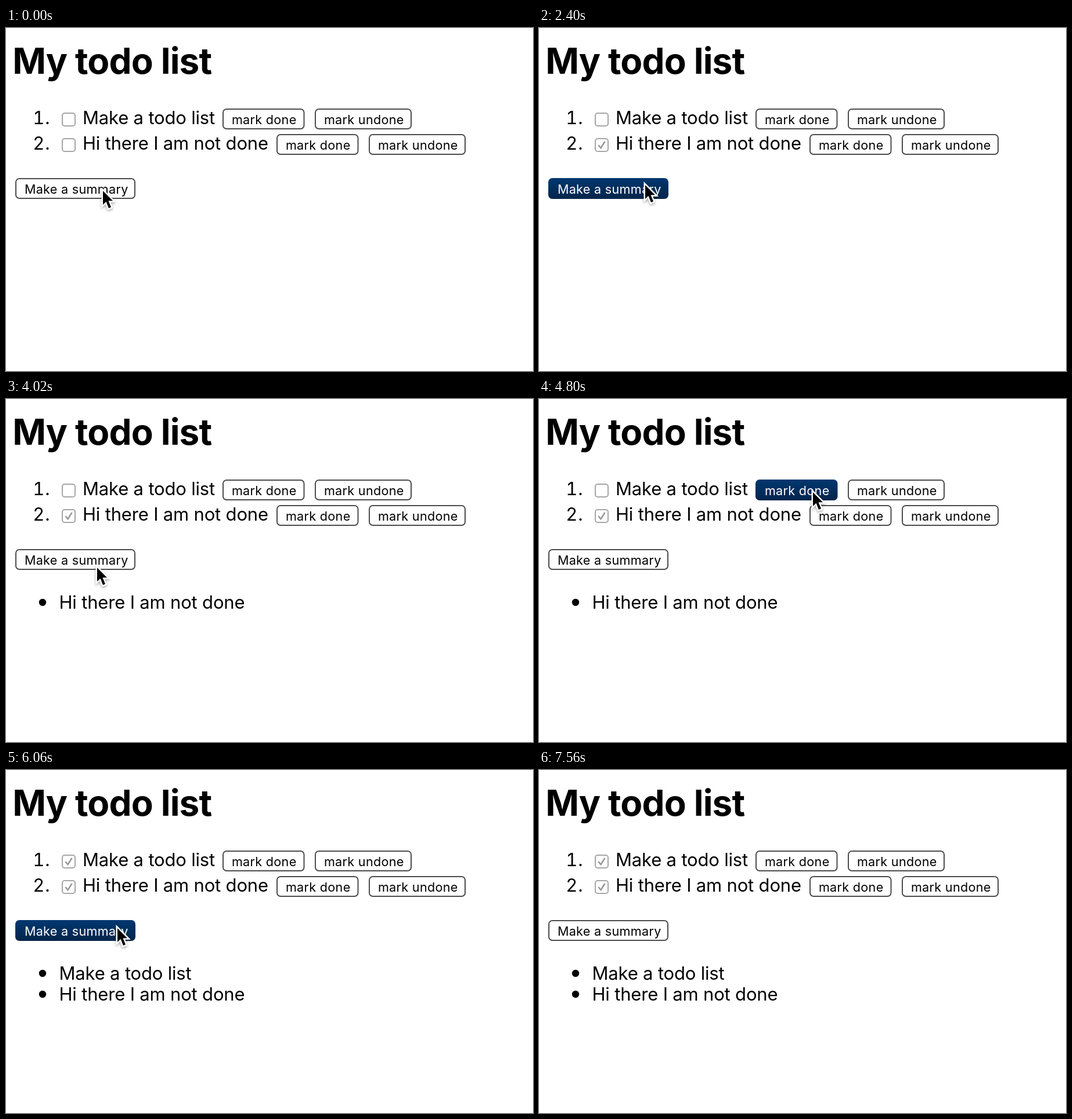
Recreate the animation shown at these times as an HTML page. Size 908 by 592 pixels, loop 7.62 s.

```html
<!DOCTYPE html>
<html lang="en">
<head>
<meta charset="utf-8">
<title>My todo list</title>
<style>
  html, body { margin: 0; width: 100%; height: 100%; overflow: hidden; background: #fff; }
  svg { display: block; }
  text { font: 430 31px Inter, sans-serif; font-optical-sizing: none; letter-spacing: -0.18px; }
  .title { font-size: 62px; font-weight: 700; letter-spacing: -0.85px; }
  .number { font-feature-settings: "tnum"; letter-spacing: 0.8px; }
  .button rect { fill: #fff; stroke: #4c4c4c; stroke-width: 2; }
  .button text { font-size: 21.6px; letter-spacing: 0.3px; }
  .button.pressed rect { fill: url(#navy); stroke: url(#navy); }
  .button.pressed text { fill: #fff; }
  .box rect { fill: #fff; stroke: #a6a6a6; stroke-width: 2; }
  .box path { fill: none; stroke: none; stroke-width: 2.6; stroke-linecap: round; stroke-linejoin: round; }
  .box.done path { stroke: #999; }
  .box.fresh rect { fill: #0a55b0; stroke: #0a55b0; }
  .box.fresh path { stroke: #fff; }
  #cursor path { stroke: #fff; stroke-width: 5; paint-order: stroke; filter: drop-shadow(0 2px 2px rgba(0, 0, 0, .35)); }
</style>
</head>
<body>
<svg id="stage" width="908" height="592" viewBox="0 0 908 592">
  <defs>
    <linearGradient id="navy" x1="0" y1="0" x2="0" y2="1">
      <stop offset="0" stop-color="#01376f"/>
      <stop offset="1" stop-color="#02264c"/>
    </linearGradient>
  </defs>
</svg>
<script>
const LOOP = 7620, STEP = 60;
const LINE = 36, ROW = 44;
const stage = document.getElementById('stage');

function add(tag, attrs, parent = stage) {
  const node = document.createElementNS('http://www.w3.org/2000/svg', tag);
  for (const name in attrs) node.setAttribute(name, attrs[name]);
  return parent.appendChild(node);
}

function label(string, x, y, parent, className = '') {
  add('text', { x, y, class: className }, parent).textContent = string;
}

function button(string, x, y, width) {
  const node = add('g', { class: 'button', transform: `translate(${x} ${y})` });
  add('rect', { x: 1, y: 1, width: width - 2, height: LINE - 2, rx: 6 }, node);
  label(string, 15.9, 27, node);
  // A point on the button, given as fractions of its size
  const spot = (u, v) => ({ x: x + u * width, y: y + v * LINE });
  return { node, spot };
}

function checkbox(y) {
  const node = add('g', { class: 'box', transform: `translate(96 ${y})` });
  add('rect', { x: 1, y: 1, width: 22, height: 22, rx: 4 }, node);
  add('path', { d: 'M7 12.8L10.5 17.2L17 6.8' }, node);
  return node;
}

function todo(index, string, buttonX) {
  const y = 166 + index * ROW;
  label(`${index + 1}.`, 46.3, y, stage, 'number');
  label(string, 132, y);
  const box = checkbox(y - 20);
  const mark = button('mark done', buttonX, y - 27, 141.5);
  button('mark undone', buttonX + 159, y - 27, 167);
  return { box, mark };
}

function bullet(string) {
  const node = add('g', {});
  add('circle', { cx: 63, cy: 351, r: 6.2 }, node);
  label(string, 91.5, 362, node);
  return node;
}

label('My todo list', 11.2, 79, stage, 'title');
const first = todo(0, 'Make a todo list', 373);
const second = todo(1, 'Hi there I am not done', 466);
const summary = button('Make a summary', 16, 259, 207);
const firstLine = bullet('Make a todo list');
const secondLine = bullet('Hi there I am not done');
const cursor = add('g', { id: 'cursor' });
add('path', { d: 'M1 1V25L6.5 19.8L11 31L15 29.3L10.5 18.3H18Z' }, cursor);

// The pointer rests at each place between two times and glides in between
const visits = [
  { place: summary.spot(0.725, 0.58), from: 0, to: 0 },
  { place: { x: 335, y: 151 }, from: 240, to: 420 },
  { place: summary.spot(0.79, 0.5), from: 720, to: 900 },
  { place: second.mark.spot(0.69, 0.33), from: 1320, to: 1680 },
  { place: summary.spot(0.8, 0.3), from: 2280, to: 2700 },
  { place: summary.spot(0.676, 0.86), from: 3480, to: 4260 },
  { place: first.mark.spot(0.69, 0.58), from: 4680, to: 4980 },
  { place: summary.spot(0.843, 0.37), from: 5340, to: 6660 },
  { place: { x: 660, y: 620 }, from: 7260, to: LOOP }
];

const during = (t, from, to) => t >= from && t < to;
const smooth = p => p * p * (3 - 2 * p);
const mix = (a, b, p) => Math.round(a + (b - a) * p);

function pointerAt(t) {
  const next = visits.findIndex(visit => visit.to > t);
  const a = visits[next - 1], b = visits[next];
  const p = smooth(Math.min(1, (t - a.to) / (b.from - a.to)));
  return [mix(a.place.x, b.place.x, p), mix(a.place.y, b.place.y, p)];
}

function press(target, on) {
  target.node.classList.toggle('pressed', on);
}

function check(box, t, clicked, settled) {
  box.classList.toggle('fresh', during(t, clicked, settled));
  box.classList.toggle('done', t >= settled);
}

function show(node, on) {
  node.setAttribute('visibility', on ? 'visible' : 'hidden');
}

function draw(t) {
  press(summary, during(t, 780, 900) || during(t, 2340, 2520) || during(t, 5760, 6120));
  press(second.mark, during(t, 1440, 1560));
  press(first.mark, during(t, 4800, 4920));
  check(second.box, t, 1560, 1980);
  check(first.box, t, 4920, 5640);

  const both = t >= 5820;
  show(firstLine, both);
  show(secondLine, t >= 2520);
  secondLine.setAttribute('transform', `translate(0 ${both ? LINE : 0})`);
  cursor.setAttribute('transform', `translate(${pointerAt(t).join(' ')})`);
}

const start = performance.now();
function tick() {
  const t = (performance.now() - start) % LOOP;
  draw(Math.floor(t / STEP) * STEP);
  requestAnimationFrame(tick);
}
tick();
</script>
</body>
</html>
```
